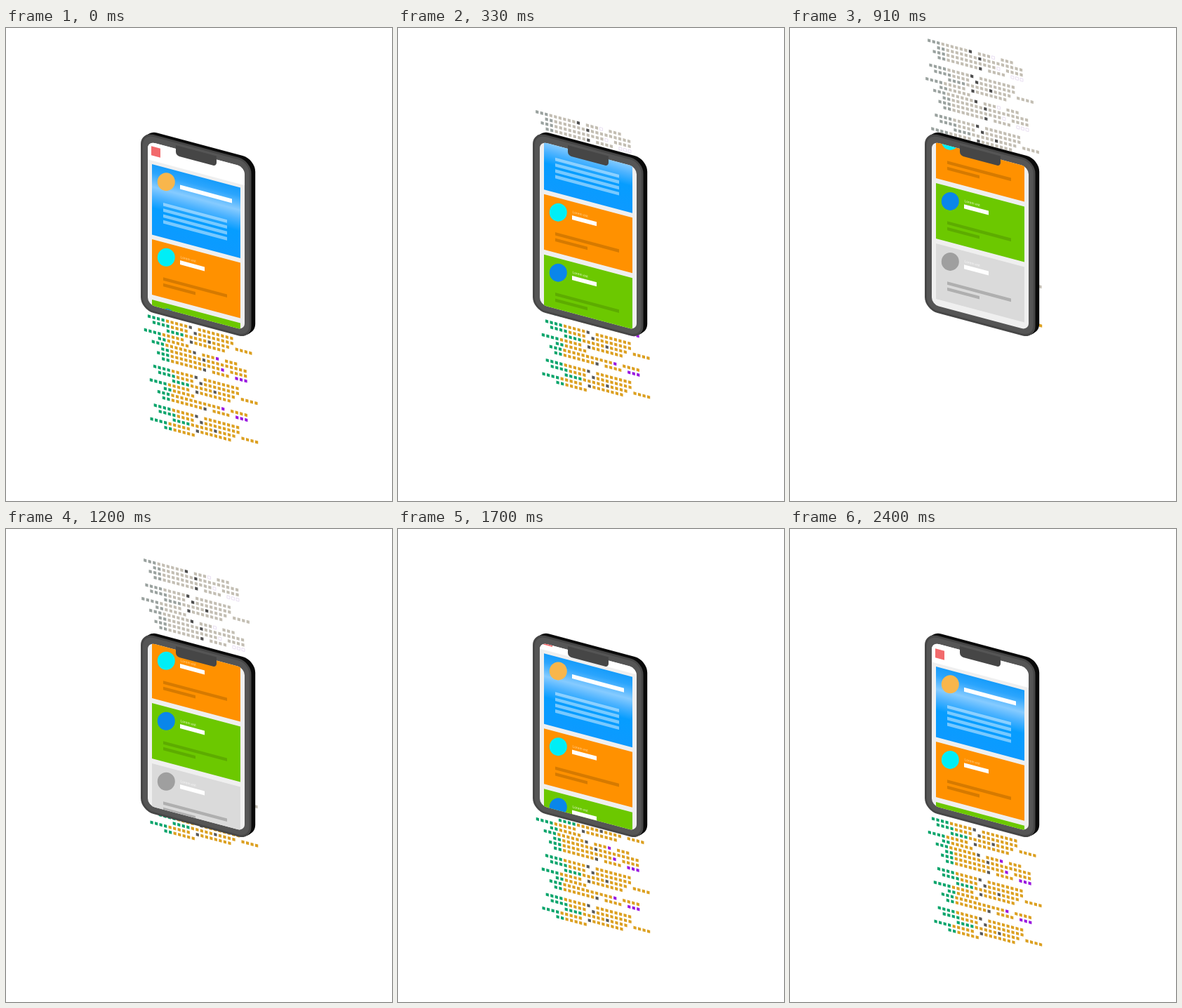
An HTML page with a canvas that plays this animation: 550 px wide and 674 px high, repeating every 2440 ms.

```html
<!DOCTYPE html>
<html lang="en">
<head>
<meta charset="utf-8">
<title>Scrolling phone</title>
<style>
html, body { margin: 0; width: 100%; height: 100%; overflow: hidden; background: #fff; }
canvas { display: block; }
</style>
</head>
<body>
<canvas id="stage" width="550" height="674"></canvas>
<script>
const ctx = document.getElementById('stage').getContext('2d');
const LOOP = 2440, SLOPE = .267;

// Scroll keys: time, offset, velocity
const keys = [
  [0, 0, .06], [330, 64, .29], [580, 127, .19], [910, 166, .04], [1040, 167.2, 0],
  [1450, 58, -.24], [1610, 27, -.13], [1990, 2, -.015], [2400, -2, .01], [LOOP, 0, .06]
];

function scrollAt(t) {
  const i = keys.findIndex(k => k[0] > t);
  const [t0, a, va] = keys[i - 1], [t1, b, vb] = keys[i];
  const d = t1 - t0, u = (t - t0) / d, w = 1 - u;
  return a * w * w * (1 + 2 * u) + b * u * u * (3 - 2 * u) + d * u * w * (va * w - vb * u);
}

// Code lines: g keyword, o plain, d dark, p accent
const lines = [
  ' gggooooood ooop ooo',
  '   ggooooooodooooooooo',
  '  gggooooooooooop oooo',
  '   ggoooooood oooo ppp',
  '',
  ' ggggoooood oooooooo',
  '  ggggoooo doooooooo',
  '     ggggooooodoooo oooo',
  'ggggooooo dooooooo',
  '   ggooooo'
];
// Blocks: first line, left edge, y of the block's first line
const COL = 6.52, ROW = 6.92, LEAN = .45;
const blocks = [[0, 191.7, 186.5], [0, 199.7, 255.7], [5, 197.5, 412], [0, 203.3, 446.6], [2, 204.9, 515.8]];
const vivid = { g: '#0ba56c', o: '#dca021', d: '#585858', p: '#9a1ae0' };
const faded = { g: '#9aa29f', o: '#c3beb3', d: '#4e4e4e' };

function rect(x, y, w, h, fill) {
  ctx.fillStyle = fill;
  ctx.fillRect(x, y, w, h);
}

function round(x, y, w, h, r, fill) {
  ctx.beginPath();
  ctx.roundRect(x, y, w, h, r);
  if (fill) { ctx.fillStyle = fill; ctx.fill(); }
}

// Avatars stay upright in the sheared plane
function disc(y, fill) {
  ctx.save();
  ctx.translate(228.3, y);
  ctx.transform(1, -SLOPE, 0, 1, 0, 0);
  ctx.beginPath();
  ctx.ellipse(0, 0, 12.5, 13, 0, 0, 7);
  ctx.fillStyle = fill;
  ctx.fill();
  ctx.restore();
}

function drawCode(scroll) {
  for (const [first, left, top] of blocks) {
    lines.slice(first).forEach((line, row) => {
      const y = top + row * ROW - scroll;
      const colors = y < 380 ? faded : vivid;
      [...line].forEach((c, col) => {
        if (c === ' ') return;
        const x = left + row * LEAN + col * COL;
        if (colors[c]) return rect(x - 2.1, y - 2.1, 4.2, 4.2, colors[c]);
        ctx.strokeStyle = '#e6daf0';
        ctx.lineWidth = .8;
        ctx.strokeRect(x - 2, y - 2, 4, 4);
      });
    });
  }
}

function drawCard(y, fill, dot, line, label) {
  rect(208, y, 126, 79, fill);
  disc(y + 20.5, dot);
  ctx.fillStyle = label;
  ctx.font = '5px Arial, sans-serif';
  ctx.fillText('Lorem est', 248.5, y + 16.3);
  rect(248, y + 19.5, 35, 6, '#fff');
  rect(224, y + 50, 91, 4.6, line);
  rect(224, y + 58.5, 46, 4.6, line);
}

function drawPage() {
  rect(200, 140, 142, 49, '#fff');
  rect(207, 168.5, 13, 13, '#f26a6c');
  const sky = ctx.createLinearGradient(0, 194, 0, 294.5);
  [[0, '#169cfb'], [.12, '#2ba5fd'], [.32, '#86cbff'], [.45, '#4db3ff'], [.62, '#069dff'], [1, '#0d9aff']]
    .forEach(s => sky.addColorStop(...s));
  rect(208, 194, 126, 100.5, sky);
  disc(213.8, '#f8b64c');
  rect(248, 213, 74, 6, '#fff');
  for (let i = 0; i < 4; i++) rect(224, 244.7 + i * 8.3, 91, 4.6, 'rgba(255,255,255,.45)');
  drawCard(301, '#ff9100', '#00eef6', 'rgba(0,0,0,.16)', 'rgba(255,255,255,.6)');
  drawCard(387, '#6cc800', '#0a86ea', 'rgba(0,0,0,.14)', 'rgba(255,255,255,.85)');
  drawCard(473, '#dadada', '#9f9f9f', 'rgba(0,0,0,.2)', '#f6f6f6');
}

function drawPhone(scroll) {
  round(197.5, 147.5, 157.7, 253, 18, '#0a0a0a');
  round(195, 149.5, 157.5, 253.5, 18, '#0a0a0a');
  round(192, 151.5, 157.5, 254, 18, '#464646');
  round(195, 154.5, 151.5, 248, 15, '#555');
  ctx.save();
  round(202, 163, 138, 232.5, 10, '#efefef');
  ctx.clip();
  ctx.translate(0, -scroll);
  drawPage();
  ctx.restore();
  round(242, 158, 58, 14.5, [0, 0, 5, 5], '#464646');
}

function frame(now) {
  const scroll = scrollAt(now % LOOP);
  ctx.setTransform(1, 0, 0, 1, 0, 0);
  rect(0, 0, 550, 674, '#fff');
  ctx.setTransform(1, SLOPE, 0, 1, 0, -SLOPE * 208);
  drawCode(scroll);
  drawPhone(scroll);
  requestAnimationFrame(() => frame(performance.now()));
}
frame(0);
</script>
</body>
</html>
```
